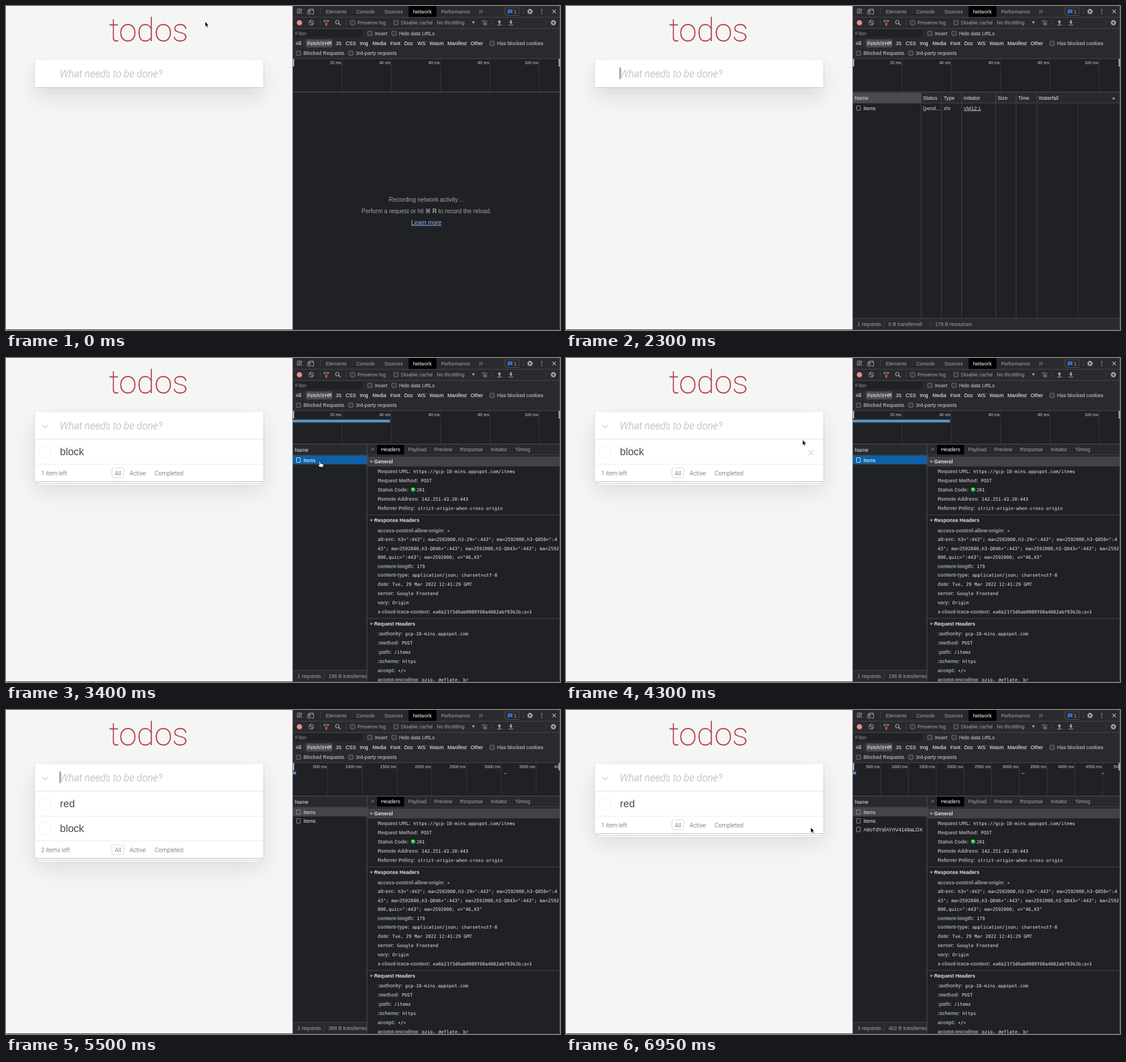
Animation, 960 px wide and 563 px high, one loop 7090 ms. Source, as an HTML page:

```html
<!DOCTYPE html>
<html lang="en">
<head>
<meta charset="utf-8">
<title>todos</title>
<style>
html, body { margin: 0; width: 100%; height: 100%; overflow: hidden; background: #f5f5f5; }
#card { position: absolute; left: 50.4px; top: 94px; width: 395.5px; background: #fff; --base: 0 1.4px 2.9px rgba(0,0,0,.2), 0 18px 36px rgba(0,0,0,.1); box-shadow: var(--base); }
#card.stack { box-shadow: 0 .7px .7px rgba(0,0,0,.2), 0 5.8px 0 -2.2px #f6f6f6, 0 6.5px .7px -2.2px rgba(0,0,0,.2), 0 11.5px 0 -4.3px #f6f6f6, 0 12.2px 1.4px -4.3px rgba(0,0,0,.2), var(--base); }
svg { position: absolute; left: 0; top: 0; }
text { font-family: "Liberation Sans", "DejaVu Sans", sans-serif; white-space: pre; }
.light { font-family: Roboto, sans-serif; font-weight: 300; }
.title { font-family: Roboto, sans-serif; font-weight: 200; stroke: #b83f45; stroke-width: .5px; }
.mono { font-family: "DejaVu Sans Mono", monospace; font-size: 7.92px; font-weight: 400; fill: #e8eaed; }
</style>
</head>
<body>
<div id="card"></div>
<svg id="stage" width="960" height="563" viewBox="0 0 960 563"></svg>
<script>
const LOOP = 7090, LEFT = 497;
const GREY = '#a0a5ab', SOFT = '#d0d3d7', PALE = '#e4e6e9', LINE = '#494c50', BAR = '#292a2d', DARK = '#202124';
const card = document.getElementById('card'), stage = document.getElementById('stage');
const pen = document.createElement('canvas').getContext('2d');

const text = (x, y, s, fill = GREY, size = 8.75, more = '') =>
  `<text x="${x}" y="${y}" fill="${fill}" font-size="${size}" ${more}>${s}</text>`;
const mid = (x, y, s, fill, size, more = '') => text(x, y, s, fill, size, 'text-anchor="middle" ' + more);
const end = (x, y, s, fill, size) => text(x, y, s, fill, size, 'text-anchor="end"');
const rect = (x, y, w, h, fill, more = '') =>
  `<rect x="${x}" y="${y}" width="${w}" height="${h}" fill="${fill}" ${more}/>`;
const path = (d, stroke = GREY, width = 1, fill = 'none') =>
  `<path d="${d}" fill="${fill}" stroke="${stroke}" stroke-width="${width}"/>`;
const solid = (d, fill = GREY) => path(d, 'none', 0, fill);
const ring = (x, y, r, stroke, width = 1, more = '') =>
  `<circle cx="${x}" cy="${y}" r="${r}" fill="none" stroke="${stroke}" stroke-width="${width}" ${more}/>`;
const dot = (x, y, r, fill) => `<circle cx="${x}" cy="${y}" r="${r}" fill="${fill}"/>`;
const vline = (x, y1, y2, color = LINE) => rect(x - .4, y1, .8, y2 - y1, color);
const hline = (y, x1 = LEFT, x2 = 960, color = LINE) => rect(x1, y, x2 - x1, .9, color);
const check = (x, y) => rect(x - 3.9, y - 3.9, 7.8, 7.8, '#36373a', 'rx="1.3" stroke="#85888c" stroke-width=".8"');
const gear = (x, y) => ring(x, y, 2.7, GREY, 2.2) + ring(x, y, 4.2, GREY, 1.6, 'stroke-dasharray="1.7 1.6"');

// value of the last [time, value] pair already reached
const at = (t, steps) => steps.reduce((v, [time, next]) => t >= time ? next : v, steps[0][1]);

const TYPED = [[0, ''], [1300, 'b'], [1500, 'bl'], [1700, 'blo'], [1900, 'bloc'], [2000, 'block'], [2300, ''],
  [4700, 'r'], [4900, 're'], [5100, 'red'], [5400, '']];
const ITEMS = [[0, []], [2400, ['block']], [5500, ['red', 'block']], [6950, ['red']]];
const REQUESTS = [[0, 0], [2300, 1], [5400, 2], [6800, 3]];
const BYTES = [[0, 0], [2400, 195], [5500, 388], [6950, 402]];
const CARET = [[0, 0], [900, 1], [2700, 0], [4500, 1], [5600, 0], [6100, 1], [6600, 0]];
const POINTER = [[0, 1], [1300, 0], [2700, 1], [4700, 0], [5800, 1]];
const MOVES = [[0, 345, 27], [400, 345, 27], [900, 265, 101], [2600, 265, 101], [2700, 430, 145], [2800, 569, 175.5],
  [3100, 543.5, 179], [3400, 543.5, 179], [4200, 415, 150], [4500, 400, 127], [5700, 400, 127],
  [6200, 432.5, 208], [6400, 424, 204]];

function pointerAt(t) {
  t = Math.floor(t / 100) * 100;
  const i = MOVES.findIndex(m => m[0] > t);
  if (i < 0) return MOVES.at(-1).slice(1);
  const [t0, x0, y0] = MOVES[i - 1], [t1, x1, y1] = MOVES[i], k = (t - t0) / (t1 - t0);
  return [x0 + (x1 - x0) * k, y0 + (y1 - y0) * k];
}

function toolbars() {
  const tabs = [[572.5, 'Elements'], [623, 'Console'], [671.5, 'Sources'], [721.5, 'Network'], [779, 'Performance']];
  const kinds = [[502, 'All'], [522, 'Fetch/XHR'], [571, 'JS'], [588.5, 'CSS'], [613, 'Img'], [635, 'Media'],
    [666, 'Font'], [690, 'Doc'], [713, 'WS'], [734, 'Wasm'], [765, 'Manifest'], [805, 'Other']];
  return rect(LEFT, 0, 463, 563, DARK) + rect(LEFT, 0, 463, 91, BAR) + rect(697.5, 0, 48.5, 19, '#000')
    + hline(19) + hline(38.5) + hline(91)
    + tabs.map(([x, s]) => mid(x, 12.6, s, s === 'Network' ? '#fff' : GREY)).join('')
    + path('M511 12.5h-6v-7h7.5v3M508 8l5.5 5.5M508 11.5V8h3.5')
    + path('M525 11V5.5h8M523 7.5h4v6.5h-4zM529 14h4v-7h-4')
    + vline(545, 4, 15) + path('M820 6.5l2.5 3-2.5 3M823.5 6.5l2.5 3-2.5 3')
    + rect(864.5, 3, 25, 13.5, 'none', `rx="1.5" stroke="${LINE}"`)
    + solid('M869.5 6h8v6h-5.5l-2.5 2.3z', '#2f7de9') + path('M871.3 8h4.5M871.3 10h3', BAR, .7)
    + text(880, 12.6, '1') + vline(897, 4, 15) + gear(908, 9.5)
    + [6, 9.5, 13].map(y => dot(928.5, y, 1, GREY)).join('') + path('M947 6.5l6 6m0-6l-6 6', GREY, 1.3)
    + dot(508.5, 29, 4.6, '#f28b82') + ring(529, 29, 3.9, GREY, 1.1) + path('M526.3 26.3l5.4 5.4', GREY, 1.1)
    + vline(544.5, 24, 34) + path('M550.5 25.5h9l-3.5 4.3v3.7h-2v-3.7z', '#f28b82')
    + ring(574, 28, 3, GREY, 1.2) + path('M576.2 30.2l3.3 3.3', GREY, 1.3) + vline(589.5, 24, 34)
    + check(600.5, 29) + text(609, 32, 'Preserve log') + check(675.5, 29) + text(684.5, 32, 'Disable cache')
    + text(746.5, 32, 'No throttling', GREY, 8.9) + solid('M807.5 26.8h5l-2.5 4.4z')
    + path('M824 27.5q5-4 10 0M826 30q3-2.5 6 0') + ring(831.5, 31.5, 1.7, GREY) + dot(828, 32, 1, GREY)
    + vline(842.5, 24, 34)
    + path('M851 33h8M871 33h8', GREY, 1.2) + solid('M855 24.5l3.3 3.5h-2v3.5h-2.6V28h-2z')
    + solid('M875 31.5l-3.3-3.5h2v-3.5h2.6V28h2z')
    + vline(936, 24, 34) + gear(948.5, 29)
    + rect(499, 41, 118, 13, DARK) + text(501, 51, 'Filter', '#8d9196', 9)
    + check(630.5, 47.5) + text(639, 50.7, 'Invert', SOFT) + check(672.5, 47.5) + text(681, 50.7, 'Hide data URLs', SOFT)
    + vline(516.5, 60, 70) + rect(519.5, 58, 46, 14, '#4a4c50', 'rx="3"')
    + kinds.map(([x, s]) => text(x, 68, s, '#fff')).join('')
    + check(842.5, 65) + text(851, 68, 'Has blocked cookies', SOFT)
    + check(507, 82) + text(515.5, 85.3, 'Blocked Requests', SOFT)
    + check(597.5, 82) + text(606, 85.3, '3rd-party requests', SOFT);
}

function headerPane() {
  const tabs = [[666.5, 'Headers'], [712.5, 'Payload'], [757.5, 'Preview'], [806.5, 'Response'], [854, 'Initiator'], [895.5, 'Timing']];
  const sections = [
    [183.2, 'General', [['Request URL', 'https://gcp-10-mins.appspot.com/items'], ['Request Method', 'POST'],
      ['Status Code', '201', 14], ['Remote Address', '142.251.43.20:443'], ['Referrer Policy', 'strict-origin-when-cross-origin']]],
    [285.3, 'Response Headers', [['access-control-allow-origin', '∗'],
      ['alt-svc', 'h3=":443"; ma=2592000,h3-29=":443"; ma=2592000,h3-Q050=":4'],
      ['', '43"; ma=2592000,h3-Q046=":443"; ma=2592000,h3-Q043=":443"; ma=2592'],
      ['', '000,quic=":443"; ma=2592000; v="46,43"'], ['content-length', '179'],
      ['content-type', 'application/json; charset=utf-8'], ['date', 'Tue, 29 Mar 2022 12:41:29 GMT'],
      ['server', 'Google Frontend'], ['vary', 'Origin'],
      ['x-cloud-trace-context', 'ea6b21f3d6ab0089f60a4002abf93b2b;o=1']]],
    [465.2, 'Request Headers', [[':authority', 'gcp-10-mins.appspot.com'], [':method', 'POST'], [':path', '/items'],
      [':scheme', 'https'], ['accept', '∗/∗'], ['accept-encoding', 'gzip, deflate, br']]]];
  const bold = 'font-weight="700"';
  let out = rect(625.5, 151, 334.5, 412, DARK) + rect(626, 151, 334, 17, BAR) + hline(168, 626)
    + vline(625.7, 151, 563, '#5b5e62') + rect(643, 151, 47, 17, '#000') + path('M633.5 156.5l4 4m0-4l-4 4')
    + tabs.map(([x, s], i) => mid(x, 162.4, s, i ? GREY : '#fff')).join('')
    + rect(626, 171, 334, 17.5, '#414245') + hline(272, 626) + hline(452, 626);
  for (const [top, title, rows] of sections) {
    out += solid(`M630.7 ${top - 4.7}h5l-2.5 4z`) + text(638, top, title, PALE, 8.7, bold);
    let y = top + 17.2;
    for (const [key, value, gap = 4.6] of rows) {
      if (!key) y -= .7;
      const label = key ? `${key}:` : '';
      out += text(644, y.toFixed(1), `${label}<tspan class="mono" dx="${key ? gap : 0}">${value}</tspan>`, GREY, 8.7, bold);
      y += 15.84;
    }
  }
  return out + dot(705.5, 228.6, 3.7, '#2fc63c') + dot(704.8, 227.2, 1.3, '#9af09b');
}

const IDLE = mid(728.5, 339.6, 'Recording network activity…', GREY, 10.25)
  + mid(728.5, 359.6, 'Perform a request or hit <tspan font-weight="700">⌘ R</tspan> to record the reload.', GREY, 10.25)
  + mid(728.5, 379.8, 'Learn more', '#8ab4f8', 10.25, 'text-decoration="underline"');
const TOOLBARS = toolbars(), PANE = headerPane();

function overview(t, open) {
  const [step, unit] = at(t, [[0, [85.4, 20]], [5500, [60.2, 500]], [6950, [48.1, 500]]]);
  let out = '';
  for (let i = 1; LEFT + i * step < 985; i++) {
    const x = LEFT + i * step;
    out += vline(x, 92, 149, '#3d4043') + end(x - 1.6, 101.3, `${i * unit} ms`, SOFT, 7.2);
  }
  const marks = at(t, [[0, []], [5500, [863]], [6950, [789.8, 928.5]]]);
  out += marks.map(x => rect(x, 109.6, 4.6, 1.3, '#85898d')).join('');
  if (t >= 2400) {
    const w = t < 5500 ? 169 : 6;
    out += open ? rect(LEFT, 106.3, w, 6.4, '#17619c') + rect(LEFT, 108, w - 1, 3, '#8596a3')
      : rect(LEFT, 109.4, w, 1.6, '#787b7e');
  }
  return out + hline(149.3, LEFT, 960, '#5f6266') + rect(497.4, 92, 1.8, 13, '#e4e4e4') + rect(957.8, 92, 1.8, 13, '#e4e4e4');
}

function table(done) {
  const heads = [[618.5, 'Status'], [654.5, 'Type'], [689, 'Initiator'], [748, 'Size'], [783.5, 'Time'], [819, 'Waterfall']];
  const out = heads.map(([x, s]) => text(x, 163, s, PALE)).join('')
    + solid('M946.5 162h5l-2.5-4.3z')
    + [615.5, 650.5, 685.5, 744.5, 780, 816].map(x => vline(x, 151, 542)).join('')
    + vline(887.5, 169, 542, '#3a3c3f')
    + text(618.5, 180.5, done ? '201' : '(pend…', SOFT) + text(654.5, 180.5, 'xhr', SOFT)
    + text(689, 180.5, 'VM12:1', SOFT, 8.75, 'text-decoration="underline"');
  return done ? out + end(777, 180.5, '195 B', SOFT) + end(812.5, 180.5, '37 ms', SOFT)
    + rect(819, 175, 5, 5, '#f1f1f1') + rect(824, 175, 2, 5, '#8b8b8b')
    + rect(826.7, 173, 46, 9, '#0aa648') + rect(872.2, 173, 5, 9, '#1e88d8') : out;
}

function network(t) {
  const count = at(t, REQUESTS), open = t >= 3100, focused = open && t < 4500;
  let out = TOOLBARS + overview(t, open);
  if (!count) return out + IDLE;
  out += rect(LEFT, 151, 463, 17.5, BAR) + hline(168.3);
  if (!open) out += rect(LEFT, 151, 118.5, 17.5, '#4a4c4f');
  out += text(500.5, 163, 'Name', PALE);
  if (open) out += rect(LEFT, 169.4, 128.5, 15.4, focused ? '#0f60a6' : '#454649');
  for (let i = 0; i < count; i++) {
    const y = 177.4 + i * 15.1, hot = !i && focused;
    out += rect(503.6, y - 4, 6.4, 8, 'none', `rx=".6" stroke="${hot ? '#fff' : GREY}" stroke-width=".9"`)
      + text(515.5, y + 3.1, i < 2 ? 'items' : 'A8oTdYsfAYrIV4149aLOX', hot ? '#fff' : PALE);
  }
  if (!open) out += table(t >= 2400);
  out += rect(LEFT, 543, 463, 20, BAR) + hline(542.3) + text(505, 555.6, `${count} requests`)
    + vline(551.5, 547, 558) + text(559, 555.6, `${at(t, BYTES)} B transferred`);
  return out + (open ? PANE : vline(632, 547, 558) + text(639.5, 555.6, '179 B resources'));
}

function todos(t, [px, py]) {
  const items = at(t, ITEMS), typed = at(t, TYPED), light = 'class="light"';
  let out = mid(247.3, 61, 'todos', '#b83f45', 56, 'class="title"');
  out += typed ? text(93.4, 123.5, typed, '#222', 17, light)
    : text(93.2, 123.5, 'What needs to be done?', '#b0b0b0', 17.45, light + ' font-style="italic"');
  if (at(t, CARET)) {
    pen.font = '300 17px Roboto, sans-serif';
    out += rect(93.2 + pen.measureText(typed).width, 107, 1, 20, '#222');
  }
  card.style.height = 46.8 + (items.length ? items.length * 43.1 + 30 : 0) + 'px';
  card.className = items.length ? 'stack' : '';
  if (!items.length) return out;
  out += path('M62.2 117l5.3 3.8 5.3-3.8', '#d8d8d8', 1.8) + hline(140.6, 50.4, 445.9, '#dcdcdc');
  items.forEach((name, i) => {
    const top = 141 + i * 43.1;
    out += ring(67, top + 22.2, 11, '#ebebeb', .8) + text(93.6, top + 28.3, name, '#484848', 17.8)
      + hline(top + 43, 50.4, 445.9, '#e8e8e8');
    const hover = at(t, POINTER) && px > 50 && px < 446 && py >= top && py < top + 43;
    if (hover) out += path(`M419.8 ${top + 18.8}l9.2 9.2m0-9.2l-9.2 9.2`, px > 410 ? '#b5626b' : '#cc9a9a', .9);
  });
  const y = 203.5 + (items.length - 1) * 43.1;
  return out + text(61, y, items.length > 1 ? '2 items left' : '1 item left', '#555', 10.2, light)
    + rect(183.5, y - 12.5, 20.8, 17, 'none', 'rx="2" stroke="#dccfd0" stroke-width=".9"')
    + mid(194, y, 'All', '#555', 10.4, light) + mid(228.2, y, 'Active', '#555', 10.4, light)
    + mid(282.3, y, 'Completed', '#555', 10.4, light);
}

function pointer(t, [x, y]) {
  if (!at(t, POINTER)) return '';
  const overInput = x > 50 && x < 446 && y > 94 && y < 141, overRow = x > LEFT && y > 169 && y < 185;
  const shape = overInput ? path('M-2-6q2 0 2 1.5v9q0 1.5-2 1.5M2-6q-2 0-2 1.5v9q0 1.5 2 1.5', '#333', .9)
    : overRow ? path('M-1 1Q0-.7 1 1L1.7 4.3 5.6 5.2Q7 5.7 6.7 7.3L6 10.6H.3L-2.8 7Q-2.6 5.5-.5 6.6z', '#111', .8, '#fff')
    : path('M0 0v9.3l2.1-1.9 1.6 3.3 1.5-.7-1.5-3.2h2.8z', '#fff', .7, '#000');
  return `<g transform="translate(${x.toFixed(1)} ${y.toFixed(1)})">${shape}</g>`;
}

let shown = '';
function draw(now) {
  const t = now % LOOP, spot = pointerAt(t);
  const scene = todos(t, spot) + network(t) + vline(496.8, 0, 563, '#6a6c6f') + vline(959.5, 0, 563, '#55575a')
    + rect(0, 562, 960, 1, '#3b3438') + pointer(t, spot);
  if (scene !== shown) stage.innerHTML = shown = scene;
  requestAnimationFrame(draw);
}
draw(0);
</script>
</body>
</html>
```
